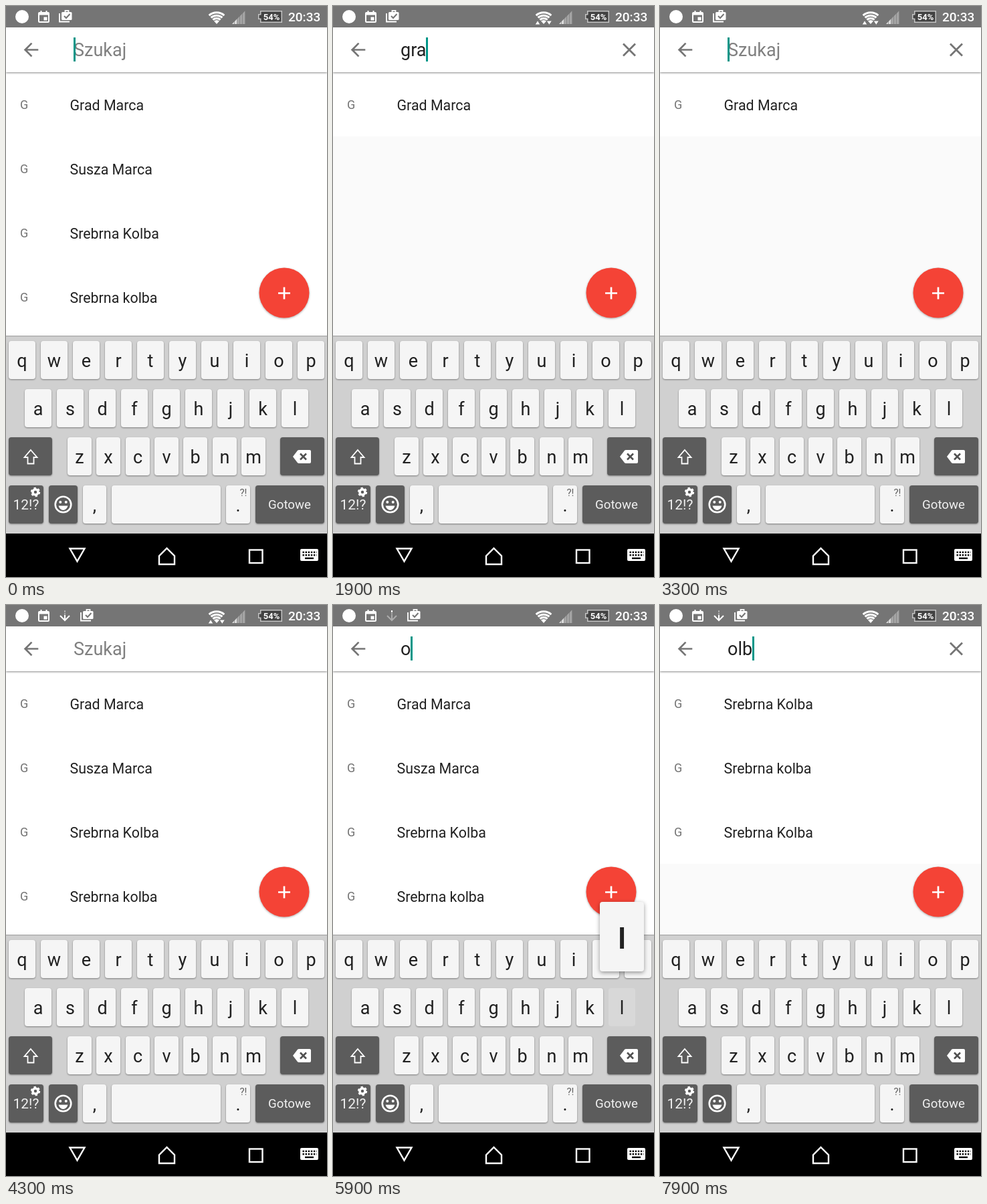
An HTML page that plays this animation: 480 px wide and 854 px high, repeating every 8000 ms.

```html
<!DOCTYPE html>
<html lang="pl">
<head>
<meta charset="utf-8">
<title>Szukaj</title>
<style>
  html, body { margin: 0; width: 100%; height: 100%; overflow: hidden; background: #fafafa; }
  svg { display: block; width: 480px; height: 854px; font-family: Roboto, "Noto Sans", sans-serif; }
  .mid { text-anchor: middle; }
  .key { fill: #f5f5f5; filter: drop-shadow(0 1.5px 1px #0006); }
  .key.dark { fill: #5c5c5c; }
  .key.down { fill: #d8d8d8; filter: none; }
  .key.dark.down { fill: #3f3f3f; }
  .letter { font-size: 27px; fill: #212121; text-anchor: middle; }
  .line { fill: none; stroke: #fff; }
</style>
</head>
<body>
<svg viewBox="0 0 480 854" xmlns="http://www.w3.org/2000/svg">
  <rect width="480" height="854" fill="#fafafa"/>
  <rect id="sheet" y="99" width="480" fill="#fff"/>
  <g id="list"></g>

  <rect y="32" width="480" height="67" fill="#fff" style="filter:drop-shadow(0 1.5px 1.5px #0007)"/>
  <path fill="#757575" transform="translate(21.3 49.3) scale(1.35)" d="M20 11H7.83l5.59-5.59L12 4l-8 8 8 8 1.41-1.41L7.83 13H20z"/>
  <path id="clear" fill="none" stroke="#757575" stroke-width="2.8" d="M434 56.5l18 18m0-18l-18 18"/>
  <text id="query" x="101" y="75" font-size="27"></text>
  <rect id="cursor" y="47" width="3" height="36" fill="#009688"/>

  <rect width="480" height="32" fill="#757575"/>
  <circle cx="24" cy="16" r="10" fill="#fff"/>
  <path fill="#fff" fill-rule="evenodd" d="M50 9h1.500V7h2v2h6V7h2v2H63q2 0 2 2v12q0 2-2 2H50q-2 0-2-2V11q0-2 2-2zM50 13.500v9.500h13v-9.500zM56.500 16.500h5v5h-5z"/>
  <g id="tasks">
    <path class="line" stroke-width="1.800" d="M80 11v12.500h15M88.500 9V6.900h5V9"/>
    <rect x="83" y="9" width="15.500" height="12" rx="1.500" fill="#fff"/>
    <path fill="none" stroke="#757575" stroke-width="2" d="M87 15l3 3 5.500-6"/>
  </g>
  <g id="download" class="line" stroke-width="2">
    <path d="M88 8v3"/><path d="M88 12v2.500"/><path d="M88 15v7M81 16l7 7 7-7"/>
  </g>
  <g id="wifi"></g>
  <path id="traffic" fill="#fff" stroke="#757575" d="M302 28l4-6.500 4 6.500zM319 22h8.500l-4.200 6.500z"/>
  <g id="signal"></g>
  <path fill="#c4c4c4" d="M377 12h3V7h33v18h-33v-5h-3z"/>
  <path fill="#424242" d="M378.500 13.500h3v-5h30v15h-30v-5h-3z"/>
  <text class="mid" x="397" y="20.500" font-size="13" font-weight="700" fill="#fff">54%</text>
  <text x="422" y="23" font-size="19" font-weight="500" fill="#fff">20:33</text>

  <circle cx="416" cy="429" r="37.500" fill="#f44336" style="filter:drop-shadow(0 1px 1.500px #0005)"/>
  <path class="line" stroke-width="2.700" d="M407 429.500h18m-9-9v18"/>

  <rect y="493" width="480" height="296" fill="#d0d0d0"/>
  <rect y="493" width="480" height="1.200" fill="#a4a4a4"/>
  <g id="keys"></g>
  <path class="line" stroke-width="1.800" d="M37 664l9.500 11h-5v9.500h-9V675h-5z"/>
  <path fill="#fff" d="M429 674l7-9.200q1-.8 2-.8h16q2 0 2 2v16q0 2-2 2h-16q-1 0-2-.8z"/>
  <path fill="none" stroke="#505050" stroke-width="2.500" d="M440 669.500l9 9m0-9l-9 9"/>
  <text class="mid" x="30" y="753" font-size="21" fill="#f0f0f0">12!?</text>
  <g class="line">
    <circle cx="44" cy="727" r="4" stroke-width="3.500"/>
    <circle cx="44" cy="727" r="6" stroke-width="2.400" stroke-dasharray="3.140"/>
    <circle cx="85.500" cy="745.500" r="11.800" stroke-width="2.600"/>
  </g>
  <path fill="#fff" d="M78.500 747.500h14q-2 6.500-7 6.500t-7-6.500z"/>
  <circle cx="81.300" cy="742" r="2" fill="#fff"/><circle cx="89.700" cy="742" r="2" fill="#fff"/>
  <text class="mid" x="355" y="733" font-size="15" fill="#616161">?!</text>
  <text class="mid" x="424" y="752" font-size="18.700" fill="#f0f0f0">Gotowe</text>

  <rect y="789" width="480" height="65" fill="#000"/>
  <g class="line" stroke-width="2.400">
    <path d="M95.500 811.500h22l-11 19zM240.500 811l11.500 11.500V835h-23v-12.500z"/>
    <rect x="364" y="813.500" width="19.500" height="19.500"/>
  </g>
  <rect x="440" y="812" width="27" height="18" rx="2" fill="#fff"/>
  <path stroke="#000" stroke-width="2.400" stroke-dasharray="2.400 1.700" d="M443.500 817h21M443.500 821.300h21"/>
  <path stroke="#000" stroke-width="2.400" d="M447 826h13"/>

  <g id="popup">
    <rect x="-33" y="-129" width="66" height="104" rx="4" fill="#f5f5f5" style="filter:drop-shadow(0 2px 3px #0006)"/>
    <text class="mid" y="-59" font-size="42" font-weight="700" fill="#212121"></text>
  </g>
</svg>
<script>
const LOOP = 8000;
const $ = id => document.getElementById(id);
const show = (el, on) => el.setAttribute('visibility', on ? 'visible' : 'hidden');

function add(parent, tag, attrs, text = '') {
  const el = document.createElementNS('http://www.w3.org/2000/svg', tag);
  for (const name in attrs) el.setAttribute(name, attrs[name]);
  el.textContent = text;
  return parent.appendChild(el);
}

// Status icons
add($('wifi'), 'path', { fill: '#fff', d: 'M315 27l-4-4.500q4-3 8 0z' });
[8.5, 12.8, 17.2].forEach(r => {
  const dx = r * Math.sin(0.72), y = 27 - r * Math.cos(0.72);
  add($('wifi'), 'path', { class: 'line', 'stroke-width': 3.1, d: `M${315 - dx} ${y}A${r} ${r} 0 0 1 ${315 + dx} ${y}` });
});
for (let i = 0; i < 5; i++) {
  const x = 338 + i * 4;
  add($('signal'), 'path', { fill: '#fff', opacity: i < 2 ? 0.75 : 0.35, d: `M${x} 27v${-i * 4}l3.400-3.800V27z` });
}

// Keyboard
const keys = {};
function addKey(name, x, y, w, dark) {
  const rect = add($('keys'), 'rect', { class: dark ? 'key dark' : 'key', x, y, width: w, height: 57, rx: 4 });
  keys[name] = { rect, x: x + w / 2, y };
  if (!dark) add($('keys'), 'text', { class: 'letter', x: x + w / 2, y: y + 39 }, name);
}
[['qwertyuiop', 4, 48, 40], ['asdfghjkl', 28, 48, 40], ['zxcvbnm', 92, 43.3, 36]].forEach(([row, x, step, w], r) =>
  [...row].forEach((c, i) => addKey(c, Math.round(x + i * step), 501 + r * 72, w)));
addKey('shift', 4, 645, 65, true);
addKey('back', 410, 645, 66, true);
addKey('symbols', 4, 717, 52, true);
addKey('emoji', 64, 717, 43, true);
addKey(',', 115, 717, 35);
addKey(' ', 158, 717, 163);
addKey('.', 329, 717, 36);
addKey('done', 373, 717, 103, true);

// Timeline: [start, value] steps and [start, end] spans
const TEXT = [[0, ''], [200, 'g'], [1300, 'gr'], [1800, 'gra'], [2600, 'gr'], [3000, 'g'], [3300, ''],
  [5700, 'o'], [6000, 'ol'], [7500, 'olb']];
const PRESSES = [[100, 200, 'g'], [1200, 1400, 'r'], [1700, 1900, 'a'], [2500, 2700, 'back'], [2900, 3000, 'back'],
  [3200, 3300, 'back'], [5600, 5800, 'o'], [5900, 6100, 'l'], [7400, 7600, 'b']];
const CURSOR_OFF = [[800, 1300], [2500, 2600], [4300, 4800], [5300, 5700], [6900, 7400]];
const FILTER = [[0, ''], [400, 'g'], [3800, ''], [6200, 'ol']];
const TITLES = ['Grad Marca', 'Susza Marca', 'Srebrna Kolba', 'Srebrna kolba', 'Srebrna Kolba'];

const valueAt = (steps, t) => steps.filter(s => s[0] <= t).pop()[1];
const spanAt = (spans, t) => spans.find(s => s[0] <= t && t < s[1]);

let listed = null;
function drawList(filter) {
  if (filter === listed) return;
  listed = filter;
  const rows = TITLES.filter(title => title.toLowerCase().includes(filter));
  $('list').replaceChildren();
  rows.slice(0, 4).forEach((title, i) => {
    add($('list'), 'text', { x: 21, y: 154 + i * 96, 'font-size': 18, fill: '#757575' }, 'G');
    add($('list'), 'text', { x: 95.5, y: 156 + i * 96, 'font-size': 21.4, fill: '#212121' }, title);
  });
  $('sheet').setAttribute('height', Math.min(rows.length * 96, 394));
  show($('clear'), filter);
}

function draw(t) {
  const text = valueAt(TEXT, t);
  $('query').textContent = text || 'Szukaj';
  $('query').setAttribute('fill', text ? '#212121' : '#808080');
  const width = text ? $('query').getComputedTextLength() : 0;
  $('cursor').setAttribute('x', Math.round(100.5 + width));
  show($('cursor'), !spanAt(CURSOR_OFF, t));
  drawList(valueAt(FILTER, t));

  const press = spanAt(PRESSES, t);
  const pressed = press && press[2];
  for (const name in keys) keys[name].rect.classList.toggle('down', name === pressed);
  show($('popup'), pressed && pressed !== 'back');
  if (pressed) {
    $('popup').setAttribute('transform', `translate(${keys[pressed].x} ${keys[pressed].y})`);
    $('popup').lastElementChild.textContent = pressed;
  }

  const downloading = t >= 3900;
  show($('download'), downloading);
  $('tasks').setAttribute('transform', `translate(${downloading ? 32 : 0})`);
  // Arrow parts dim and light up one after another
  [...$('download').children].forEach((part, i) =>
    part.setAttribute('opacity', (t - 3500 - i * 200) % 1200 < 600 ? 1 : 0.4));
  show($('traffic'), t >= 900 && t < 4800);
}

function frame() {
  draw(performance.now() % LOOP);
  requestAnimationFrame(frame);
}
frame();
</script>
</body>
</html>
```
